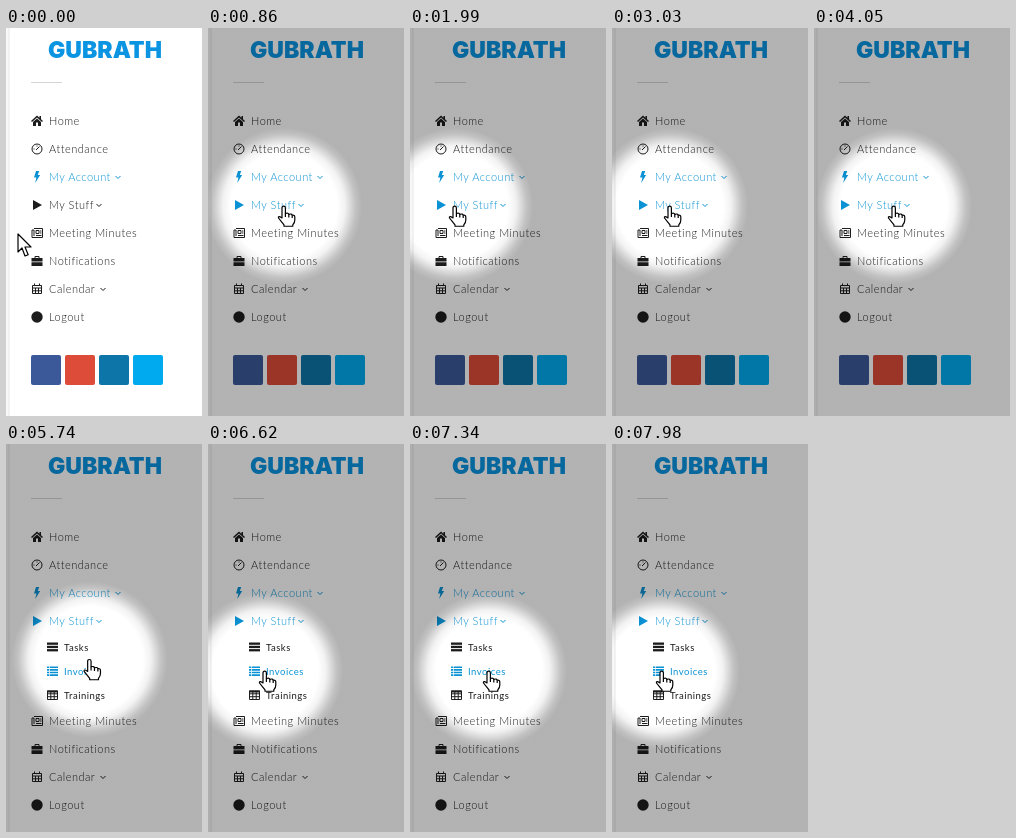
Animation of 196x388 px, one loop 8000 ms. Source, as an HTML page:

```html
<!DOCTYPE html>
<html lang="en">
<head>
<meta charset="utf-8">
<title>Sidebar menu</title>
<style>
  html, body { margin: 0; width: 100%; height: 100%; overflow: hidden; background: #fff; }
  svg { display: block; width: 100%; height: 100%; }
  text { font: 300 11px Lato, sans-serif; letter-spacing: .5px; }
  .sub text { font-size: 9.5px; font-weight: 400; }
  .brand { font: 900 23px Inter, sans-serif; letter-spacing: 0; fill: #0a94e2; }
  .row { color: #1c1c1c; fill: currentColor; }
  .row.on { color: #0a92d4; }
  .line { fill: none; stroke: currentColor; }
  .cursor { fill: #fff; stroke: #000; stroke-width: 1.2; stroke-linejoin: round; }
</style>
</head>
<body>
<svg viewBox="0 0 196 388">
  <defs>
    <radialGradient id="glow" gradientUnits="userSpaceOnUse" cx="0" cy="0" r="78">
      <stop offset=".68" stop-opacity="0"/>
      <stop offset=".78" stop-opacity=".05"/>
      <stop offset=".92" stop-opacity=".24"/>
      <stop offset="1" stop-opacity=".3"/>
    </radialGradient>
    <clipPath id="fold"><rect id="foldBox" x="0" y="190" width="196" height="0"/></clipPath>
  </defs>
  <rect width="196" height="388" fill="#fff"/>
  <rect width="3" height="388" fill="#f8f8f8"/>
  <path d="M3 0V388" stroke="#e8e8e8"/>
  <text class="brand" x="42" y="30">GUBRATH</text>
  <path d="M25 54.5H56" stroke="#d5d5d5"/>
  <g id="upper"></g>
  <g id="submenu" clip-path="url(#fold)"></g>
  <g id="lower"></g>
  <g id="spot">
    <rect x="-400" y="-600" width="800" height="1200" fill="url(#glow)"/>
    <g class="cursor" transform="translate(0 1) scale(1 .92)">
      <path d="M-2 12V1q0-2 1.7-2t1.7 2v6q3-1 3.4 1 3-1 3.4 1 2.6-.6 2.6 2v3q0 3-2 5.5V21H0v-1.5L-5.5 12q-.6-3 3.5 0z"/>
      <path d="M1.4 7v4M4.8 8v3.5M8.2 9v3"/>
    </g>
  </g>
  <path id="arrow" class="cursor" transform="translate(12 206)" d="M0 0V18l4-4 3 8 3.2-1.2L7 13h6z"/>
</svg>
<script>
const $ = id => document.getElementById(id);
const repeat = (count, make) => Array.from({ length: count }, (_, i) => make(i)).join('');
const solid = d => `<path d="${d}"/>`;
const line = d => `<path class="line" d="${d}"/>`;

// Icons are drawn around their own centre.
const icons = {
  home: solid('M-6 0 0-5.5 6 0 5 1 0-3.6-5 1zM-4 1 0-2.6 4 1V5H1V1.5H-1V5H-4zM2.5-5H4v4H2.5z'),
  gauge: '<circle class="line" r="5"/>' + line('M-1 1 2.5-2.5M-3.5 0h1M0-3.5v1'),
  bolt: solid('M-1-6H2.2L.8-2H3.2L-1.8 6-.6 .5H-3z'),
  play: solid('M-4-5 5 0-4 5z'),
  news: line('M-3-4.5H5.5V4.5H-5V-3H-3V3M-1-2.5H2V.5H-1zM3-2h1.5M3 0h1.5M-1 2.5H4.5'),
  briefcase: line('M-2-3V-4.5H2V-3') + solid('M-5.5-3h11V.4h-11zM-5.5 1.2h11V5h-11z'),
  calendar: line('M-4.5-3.5h9v8h-9zM-4.5-1h9M-4.5 1.8h9M-1.5-1v5M1.5-1v5M-2.5-5.5v2M2.5-5.5v2'),
  disc: '<circle r="5.7"/>',
  tasks: repeat(3, i => solid(`M-5.5 ${3.3 * i - 4.5}h11v2.3h-11z`)),
  list: repeat(4, i => solid(`M-5.5 ${2.6 * i - 4.5}h2v1.6h-2zm2.7 0h8.3v1.6h-8.3z`)),
  table: solid('M-5.5-4.5h11v2h-11z') + line('M-5-4H5V4.5H-5zM-5-1.2H5M-5 1.7H5M-1.7-4V4.5M1.7-4V4.5')
};

function addRow(parent, y, [icon, label, chevron], sub) {
  const row = document.createElementNS('http://www.w3.org/2000/svg', 'g');
  row.setAttribute('class', sub ? 'row sub' : 'row');
  row.innerHTML = `<g transform="translate(${sub ? 46.5 : 31} ${y})">${icons[icon]}</g>
    <text x="${sub ? 58 : 43}" y="${y + (sub ? 3.5 : 4)}">${label}</text>
    ${chevron ? line(`M${chevron - 2.5} ${y - 1}l2.5 2.5 2.5-2.5`) : ''}`;
  $(parent).append(row);
  return row;
}

const addRows = (parent, top, gap, items, sub = false) =>
  items.map((item, i) => addRow(parent, top + gap * i, item, sub));

const [, , account, stuff] = addRows('upper', 93, 28, [
  ['home', 'Home'], ['gauge', 'Attendance'], ['bolt', 'My Account', 112], ['play', 'My Stuff', 93]]);
const subRows = addRows('submenu', 203, 24, [
  ['tasks', 'Tasks'], ['list', 'Invoices'], ['table', 'Trainings']], true);
addRows('lower', 205, 28, [
  ['news', 'Meeting Minutes'], ['briefcase', 'Notifications'], ['calendar', 'Calendar', 97], ['disc', 'Logout']]);
$('lower').innerHTML += ['#3b5998', '#dd4b39', '#0d75a8', '#00aaee'].map((color, i) =>
  `<rect x="${25 + 34 * i}" y="327" width="30" height="30" rx="2" fill="${color}"/>`).join('');
account.classList.add('on');

const LOOP = 8000, SHOW = 20, MOVE = 580, STEP = 136;
// Times and places where the pointer turns sideways.
const turns = [[MOVE, 80], [852, 76], [1600, 86], [1940, 45], [2600, 70], [3028, 58],
  [4200, 82], [4932, 79], [6050, 86], [6564, 57], [7250, 79], [7924, 50]];

function ease(t, start, end) {
  const k = Math.max(0, Math.min(1, (t - start) / (end - start)));
  return .5 - .5 * Math.cos(Math.PI * k);
}

// Each turn adds its eased offset to the one before.
const pointerX = t => turns.slice(1).reduce((x, [end, next], i) =>
  x + (next - turns[i][1]) * ease(t, turns[i][0], end), turns[0][1]);
const pointerY = t => 178 + 26 * ease(t, 4400, 4932) + 23 * ease(t, 5030, 6200);

function draw(time) {
  const now = time % LOOP;
  const active = now >= SHOW;
  const t = MOVE + STEP * Math.floor((now - MOVE) / STEP);
  const x = pointerX(t), y = pointerY(t);
  const open = 72 * ease(t, 4100, 4520);
  const hovered = Math.floor((y - 191) / 24);

  $('arrow').style.display = active ? 'none' : '';
  $('spot').style.display = active ? '' : 'none';
  $('spot').setAttribute('transform', `translate(${x} ${y})`);
  $('foldBox').setAttribute('height', open);
  $('lower').setAttribute('transform', `translate(0 ${open})`);
  stuff.classList.toggle('on', active);
  subRows.forEach((row, i) => row.classList.toggle('on', i === hovered));
}

const begin = performance.now();
function tick() {
  draw(performance.now() - begin);
  requestAnimationFrame(tick);
}
tick();
</script>
</body>
</html>
```
